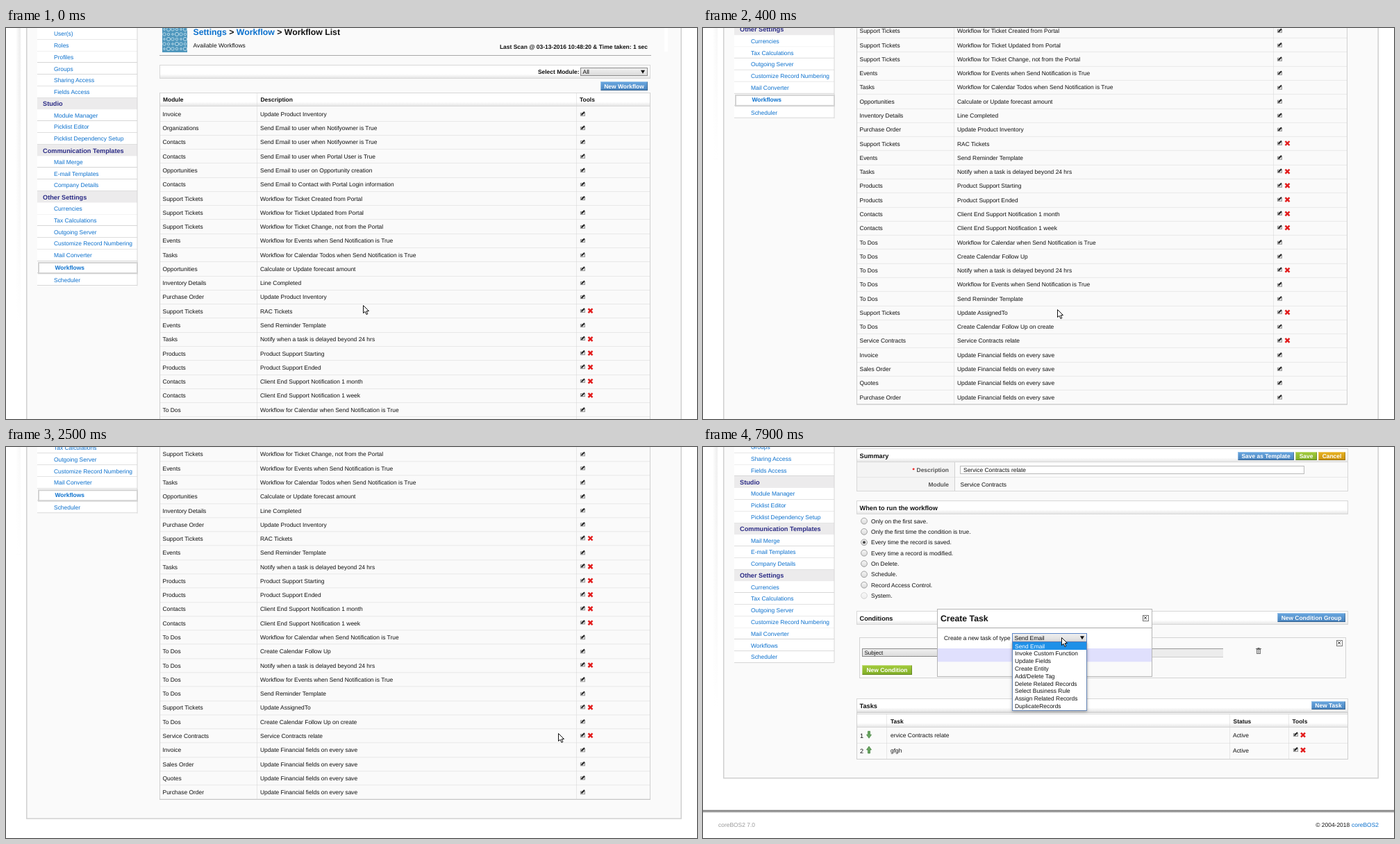
Recreate the animation shown at these times as an HTML page with a canvas. Size 995x563 px, loop 8000 ms.

```html
<!DOCTYPE html>
<html lang="en">
<head>
<meta charset="utf-8">
<title>Workflow settings</title>
<style>
html, body { margin: 0; width: 100%; height: 100%; overflow: hidden; background: #fff; }
canvas { display: block; }
</style>
</head>
<body>
<canvas id="stage" width="995" height="563"></canvas>
<script>
const g = document.getElementById('stage').getContext('2d');
const SMALL = 8.45, MEDIUM = 9.2, LARGE = 12.27;
const LINK = '#0b70cd', LINE = '#d0d0d0';

const menu = ['User(s)', 'Roles', 'Profiles', 'Groups', 'Sharing Access', 'Fields Access',
  '#Studio', 'Module Manager', 'Picklist Editor', 'Picklist Dependency Setup',
  '#Communication Templates', 'Mail Merge', 'E-mail Templates', 'Company Details',
  '#Other Settings', 'Currencies', 'Tax Calculations', 'Outgoing Server',
  'Customize Record Numbering', 'Mail Converter', 'Workflows', 'Scheduler'];

// A trailing "x" field marks a row that can be deleted.
const workflows = `Invoice|Update Product Inventory
Organizations|Send Email to user when Notifyowner is True
Contacts|Send Email to user when Notifyowner is True
Contacts|Send Email to user when Portal User is True
Opportunities|Send Email to user on Opportunity creation
Contacts|Send Email to Contact with Portal Login information
Support Tickets|Workflow for Ticket Created from Portal
Support Tickets|Workflow for Ticket Updated from Portal
Support Tickets|Workflow for Ticket Change, not from the Portal
Events|Workflow for Events when Send Notification is True
Tasks|Workflow for Calendar Todos when Send Notification is True
Opportunities|Calculate or Update forecast amount
Inventory Details|Line Completed
Purchase Order|Update Product Inventory
Support Tickets|RAC Tickets|x
Events|Send Reminder Template
Tasks|Notify when a task is delayed beyond 24 hrs|x
Products|Product Support Starting|x
Products|Product Support Ended|x
Contacts|Client End Support Notification 1 month|x
Contacts|Client End Support Notification 1 week|x
To Dos|Workflow for Calendar when Send Notification is True
To Dos|Create Calendar Follow Up
To Dos|Notify when a task is delayed beyond 24 hrs|x
To Dos|Workflow for Events when Send Notification is True
To Dos|Send Reminder Template
Support Tickets|Update AssignedTo|x
To Dos|Create Calendar Follow Up on create
Service Contracts|Service Contracts relate|x
Invoice|Update Financial fields on every save
Sales Order|Update Financial fields on every save
Quotes|Update Financial fields on every save
Purchase Order|Update Financial fields on every save`.split('\n').map(row => row.split('|'));

const triggers = ['Only on the first save.', 'Only the first time the condition is true.',
  'Every time the record is saved.', 'Every time a record is modified.', 'On Delete.',
  'Schedule.', 'Record Access Control.', 'System.'];
const taskTypes = ['Send Email', 'Invoke Custom Function', 'Update Fields', 'Create Entity',
  'Add/Delete Tag', 'Delete Related Records', 'Select Business Rule',
  'Assign Related Records', 'DuplicateRecords'];

// y is the middle of the capitals.
function text(str, x, y, { size = SMALL, bold, color = '#111', align = 'left' } = {}) {
  g.font = `${bold ? 'bold ' : ''}${size}px "Liberation Sans", Arial, sans-serif`;
  g.textRendering = 'geometricPrecision';
  g.textAlign = align;
  g.fillStyle = color;
  g.fillText(str, x, y + size * 0.36);
}

function fill(x, y, w, h, color) {
  g.fillStyle = color;
  g.fillRect(x, y, w, h);
}

function box(x, y, w, h, border, color) {
  if (color) fill(x, y, w, h, color);
  g.strokeStyle = border;
  g.lineWidth = 1;
  g.strokeRect(Math.round(x) + 0.5, Math.round(y) + 0.5, w - 1, h - 1);
}

function path(points, stroke, width = 1, color) {
  g.beginPath();
  points.forEach(([x, y]) => g.lineTo(x, y));
  if (color) { g.closePath(); g.fillStyle = color; g.fill(); }
  if (stroke) { g.strokeStyle = stroke; g.lineWidth = width; g.stroke(); }
}

function dotted(x1, y1, x2, y2, color = '#d4d4d4') {
  g.setLineDash([1, 1]);
  path([[x1, y1], [x2, y2]].map(p => p.map(v => Math.floor(v) + 0.5)), color);
  g.setLineDash([]);
}

function shade(x, y, h, ...colors) {
  const gradient = g.createLinearGradient(0, y, 0, y + h);
  colors.forEach((c, i) => gradient.addColorStop(i / (colors.length - 1), c));
  return gradient;
}

function bar(y, right, title, h = 20) {
  box(221, y, right - 221, h, '#d8d8d8', shade(221, y, h, '#fff', '#fff', '#fff', '#e2e2e2'));
  if (title) text(title, 225.5, y + 10.3, { size: MEDIUM, bold: true });
}

function button(label, x, y, w, h, top, bottom) {
  fill(x, y, w, h, shade(x, y, h, top, bottom));
  path([[x, y + h - 0.5], [x + w - 0.5, y + h - 0.5], [x + w - 0.5, y]], 'rgba(0,0,0,.25)');
  path([[x + 0.5, y + h], [x + 0.5, y + 0.5], [x + w, y + 0.5]], 'rgba(255,255,255,.35)');
  text(label, x + w / 2, y + h / 2, { bold: true, color: '#fff', align: 'center' });
}
const blueButton = (label, x, y, w, h = 12) => button(label, x, y, w, h, '#69a7e0', '#4782bd');
const greenButton = (label, x, y, w, h) => button(label, x, y, w, h, '#a4cc3c', '#80ae27');

function select(label, x, y, w, h, size = SMALL, border = '#8a8a8a') {
  box(x, y, w, h, border, shade(x, y, h, '#f1f1f1', '#dadada'));
  text(label, x + 3.5, y + h / 2 + 0.2, { size });
  const ax = x + w - 7, ay = y + h / 2;
  path([[ax - 3, ay - 2.3], [ax + 3, ay - 2.3], [ax, ay + 2.7]], null, 0, '#111');
}

function editIcon(x, y) {
  box(x - 3.5, y - 2, 7, 5, '#999', '#e0e0e0');
  path([[x - 1.5, y + 1.5], [x + 3, y - 3]], '#222', 2);
}

function deleteIcon(x, y) {
  for (const s of [-1, 1]) path([[x - 3, y - 3 * s], [x + 3, y + 3 * s]], '#e31c1c', 2.4);
}

function closeIcon(x, y) {
  box(x - 4.5, y - 4.5, 9, 9, '#777', '#fff');
  for (const s of [-1, 1]) path([[x - 2.2, y - 2.2 * s], [x + 2.2, y + 2.2 * s]], '#444');
}

function moveArrow(x, y, dir) {
  path([[-1.5, -5], [1.5, -5], [1.5, 0], [3.5, 0], [0, 5], [-3.5, 0], [-1.5, 0]]
    .map(([dx, dy]) => [x + dx, y + dy * dir]), '#3c7a35', 0.7, '#69a660');
}

function panel(top, bottom, fade) {
  fill(0, 0, 995, 563, '#fff');
  const side = g.createLinearGradient(14, 0, 22, 0);
  side.addColorStop(0, '#fff');
  side.addColorStop(0.75, '#ececec');
  side.addColorStop(1, '#fff');
  fill(14, 0, 8, fade, side);
  fill(14, fade - 430, 8, 430, shade(14, fade - 430, 430, 'rgba(255,255,255,0)', '#fff'));
  fill(29, top, 944, bottom - top, '#d0d0d0');
  fill(30.5, top, 941, bottom - top - 1.5, '#fafafa');
}

function sidebar(y0, selected) {
  menu.forEach((item, i) => {
    const heading = item[0] === '#', active = selected && item === 'Workflows';
    let y = y0 + 16.78 * i;
    if (active) y += 0.8;
    if (selected && item === 'Scheduler') y += 2.3;
    fill(45, y - 8.4, 144, 17, heading ? '#ecebec' : '#fff');
    if (heading) return text(item.slice(1), 53, y + 0.2, { size: MEDIUM, bold: true, color: '#2b2b85' });
    fill(45, Math.round(y + 7.6), 144, 1, '#d6d6d6');
    if (active) {
      g.strokeStyle = '#d2d2d2';
      g.lineWidth = 2;
      g.strokeRect(47, Math.round(y - 7), 142, 15.5);
    }
    text(item, active ? 70.5 : 69, y, { bold: active, color: LINK });
  });
  fill(188.5, y0 - 10, 1, 16.78 * 22 + (selected ? 4 : 1.5), '#d6d6d6');
}

function listPage(scroll) {
  panel(0, 811.5 - scroll, 430 - scroll);
  g.save();
  g.translate(0, -scroll);
  fill(948, 0, 5, 34, '#fff');
  sidebar(8.2, true);

  fill(225, -2, 36, 37, '#4f97bd');
  for (let i = 0; i < 30; i++) {
    g.beginPath();
    g.arc(228 + (i % 6) * 6, 2 + Math.floor(i / 6) * 7, 1.3 + (i * 7 % 4) * 0.45, 0, 7);
    g.strokeStyle = '#b4d7e7';
    g.lineWidth = 1;
    g.stroke();
  }
  let x = 269.5;
  for (const [part, color] of [['Settings', LINK], [' > '], ['Workflow', LINK], [' > Workflow List']]) {
    text(part, x, 5.5, { size: LARGE, bold: true, color });
    x += g.measureText(part).width;
  }
  text('Available Workflows', 269.5, 25.3);
  text('Last Scan @ 03-13-2016 10:48:20 & Time taken: 1 sec', 924, 26.7, { bold: true, align: 'right' });
  dotted(221, 39, 928, 39, '#555');
  bar(53, 928);
  text('Select Module:', 825.5, 62.7, { bold: true, align: 'right' });
  select('All', 827, 57, 97, 12);
  blueButton('New Workflow', 856, 77, 68, 13);

  bar(93, 928);
  text('Module', 226, 103.4, { bold: true });
  text('Description', 366.5, 103.4, { bold: true });
  text('Tools', 826, 103.4, { bold: true });
  workflows.forEach(([module, description, removable], i) => {
    const y = 123.8 + 20.28 * i;
    text(module, 225.5, y);
    text(description, 366, y);
    editIcon(830, y - (removable ? 1 : 0));
    if (removable) deleteIcon(841.5, y - 0.5);
    if (i < workflows.length - 1) dotted(222, y + 10.2, 927, y + 10.2);
  });
  dotted(361, 94, 361, 783);
  dotted(821, 94, 821, 783);
  fill(221, 93, 1, 690, LINE);
  fill(927, 93, 1, 690, LINE);
  fill(221, 782.5, 707, 1.2, '#c4c4c4');
  g.restore();
}

function editPage() {
  panel(0, 477.5, 375);
  sidebar(-50.1, false);

  bar(2, 929, 'Summary');
  blueButton('Save as Template', 770, 7, 81);
  greenButton('Save', 853, 7, 31, 12);
  button('Cancel', 886, 7, 39, 12, '#e8b322', '#cc930e');
  fill(222, 22, 140, 41, '#f4f4f4');
  dotted(222, 43, 928, 43);
  fill(362, 22, 1, 41, LINE);
  box(221, 21, 708, 43, '#d8d8d8');
  text('*', 301.5, 33, { bold: true, color: '#e00' });
  text('Description', 354, 33, { bold: true, color: '#555', align: 'right' });
  text('Module', 354, 53.5, { bold: true, color: '#555', align: 'right' });
  box(370, 27, 496, 12, '#bbb', '#fff');
  text('Service Contracts relate', 375, 33);
  text('Service Contracts', 370.5, 53.5);

  bar(77, 929, 'When to run the workflow');
  triggers.forEach((label, i) => {
    const y = 106.6 + 15.35 * i;
    g.globalAlpha = i === 7 ? 0.4 : 1;
    g.beginPath();
    g.arc(232, y, 4.4, 0, 7);
    g.fillStyle = shade(0, y - 4, 9, '#f5f5f5', '#d8d8d8');
    g.fill();
    g.strokeStyle = '#8c8c8c';
    g.lineWidth = 0.8;
    g.stroke();
    g.globalAlpha = 1;
    if (i === 2) {
      g.beginPath();
      g.arc(232, y, 2, 0, 7);
      g.fillStyle = '#444';
      g.fill();
    }
    text(label, 242, y);
  });

  bar(236, 929, 'Conditions');
  blueButton('New Condition Group', 827, 239, 98, 13);
  box(225, 274, 701, 59, '#d4d4d4');
  closeIcon(916, 282);
  select('Subject', 229, 290, 231, 12, 8);
  select('does not start with', 470, 290, 115, 12, 8);
  fill(596, 290, 153, 13, '#ececec');
  path([[596.5, 303], [596.5, 290.5], [749, 290.5]], '#999');
  path([[596, 302.5], [749, 302.5]], '#ccc');
  text('relate', 597, 296.5);
  box(797, 291, 6, 7, '#777', '#ddd');
  fill(796, 290, 8, 1, '#666');
  fill(798.5, 289, 3, 1, '#666');
  fill(799.5, 292, 1, 5, '#888');
  greenButton('New Condition', 229, 314, 72, 14);

  bar(362, 929, 'Tasks');
  blueButton('New Task', 876, 366, 49);
  bar(384, 929);
  text('Task', 270, 394.5, { bold: true });
  text('Status', 763.5, 394.5, { bold: true });
  text('Tools', 848.5, 394.5, { bold: true });
  ['ervice Contracts relate', 'gfgh'].forEach((name, i) => {
    const y = 415.3 + 21.7 * i;
    text(i + 1, 226, y + 0.5, { size: MEDIUM });
    moveArrow(239, y - 1, i ? -1 : 1);
    text(name, 270, y);
    text('Active', 763, y);
    editIcon(853, y - 1.3);
    deleteIcon(864, y - 0.6);
  });
  dotted(222, 426, 928, 426);
  for (const x of [264, 758, 843]) dotted(x, 384, x, 449);
  box(221, 382, 708, 68, LINE);

  fill(0, 522, 995, 5, shade(0, 522, 5, '#fff', '#777', '#aaa', '#fff'));
  text('coreBOS2 7.0', 22, 544.2, { color: '#999' });
  text('© 2004-2018 ', 933.5, 544.2, { align: 'right' });
  text('coreBOS2', 973, 544.2, { color: LINK, align: 'right' });
}

function dialog(focused, open) {
  box(337, 233, 310, 98, '#b5b5b5', '#fff');
  text('Create Task', 342, 246.2, { size: LARGE, bold: true });
  closeIcon(637, 246);
  fill(338, 260, 308, 1, '#aaa');
  text('Create a new task of type', 347, 274.8);
  fill(338, 290, 308, 19.5, '#e0e0fd');
  fill(338, 309.5, 308, 20.5, '#fafafa');
  select('Send Email', 445, 268, 108, 13, SMALL, focused ? '#5d86c8' : '#8a8a8a');
  if (!open) return;
  g.shadowColor = 'rgba(0,0,0,.35)';
  g.shadowBlur = 4;
  g.shadowOffsetY = 1;
  fill(445, 281, 108, 99, '#fff');
  g.shadowColor = 'transparent';
  box(445, 281, 108, 99, '#6585b5');
  fill(446, 281, 106, 11, '#1e90e8');
  taskTypes.forEach((label, i) => text(label, 449, 286.6 + 10.8 * i, { color: i ? '#111' : '#fff' }));
}

function cursor(x, y, beam) {
  if (beam) {
    for (const [color, w] of [['#fff', 3], ['#111', 1.2]]) {
      path([[x, y - 5], [x, y + 5]], color, w);
      for (const s of [-5, 5]) path([[x - 3, y + s], [x + 3, y + s]], color, w);
    }
    return;
  }
  path([[0, 0], [0, 11], [2.6, 8.8], [4.5, 13], [6.3, 12.2], [4.5, 8.2], [8, 8]]
    .map(([dx, dy]) => [x + 0.5 + dx, y + 0.5 + dy]), '#111', 1, '#fff');
}

const mix = (a, b, k) => a + (b - a) * k;
const progress = (t, from, to) => Math.min(1, Math.max(0, (t - from) / (to - from)));

function pointer(t) {
  if (t >= 7500) return [516, 274];
  if (t >= 7300) return [526, 282];
  if (t >= 7200) return [700, 326];
  if (t >= 6400) return [894, 372];
  if (t >= 1800) {
    const k = progress(t, 1700, 2500), e = k * k * (3 - 2 * k);
    return [mix(338, 795, e), mix(439, 412, e)];
  }
  if (t >= 800) {
    const k = progress(t, 700, 1500);
    return [mix(mix(508, 430, k), mix(430, 338, k), k), mix(mix(407, 480, k), mix(480, 439, k), k)];
  }
  if (t < 200) return [514, 399];
  const k = progress(t, 200, 500);
  return [mix(514, 508, k), mix(401, 407, k)];
}

function draw(now) {
  const t = Math.floor(now % 8000 / 100) * 100;
  const [x, y] = pointer(t);
  if (t < 6400) {
    listPage([0, 0, 151.7, 201, 241.2][t / 100] ?? 275.7);
    const moving = t >= 800 && t < 2500;
    const overText = moving && x > 366 && x < 507 && Math.abs((y - 436.2 + 203) % 20.28 - 0.2) < 6;
    if (t === 200) cursor(514, 405, true);
    else cursor(x, y, overText);
  } else {
    editPage();
    if (t >= 6800) dialog(t >= 7500, t >= 7900);
    cursor(x, y);
  }
  requestAnimationFrame(draw);
}
requestAnimationFrame(draw);
</script>
</body>
</html>
```
